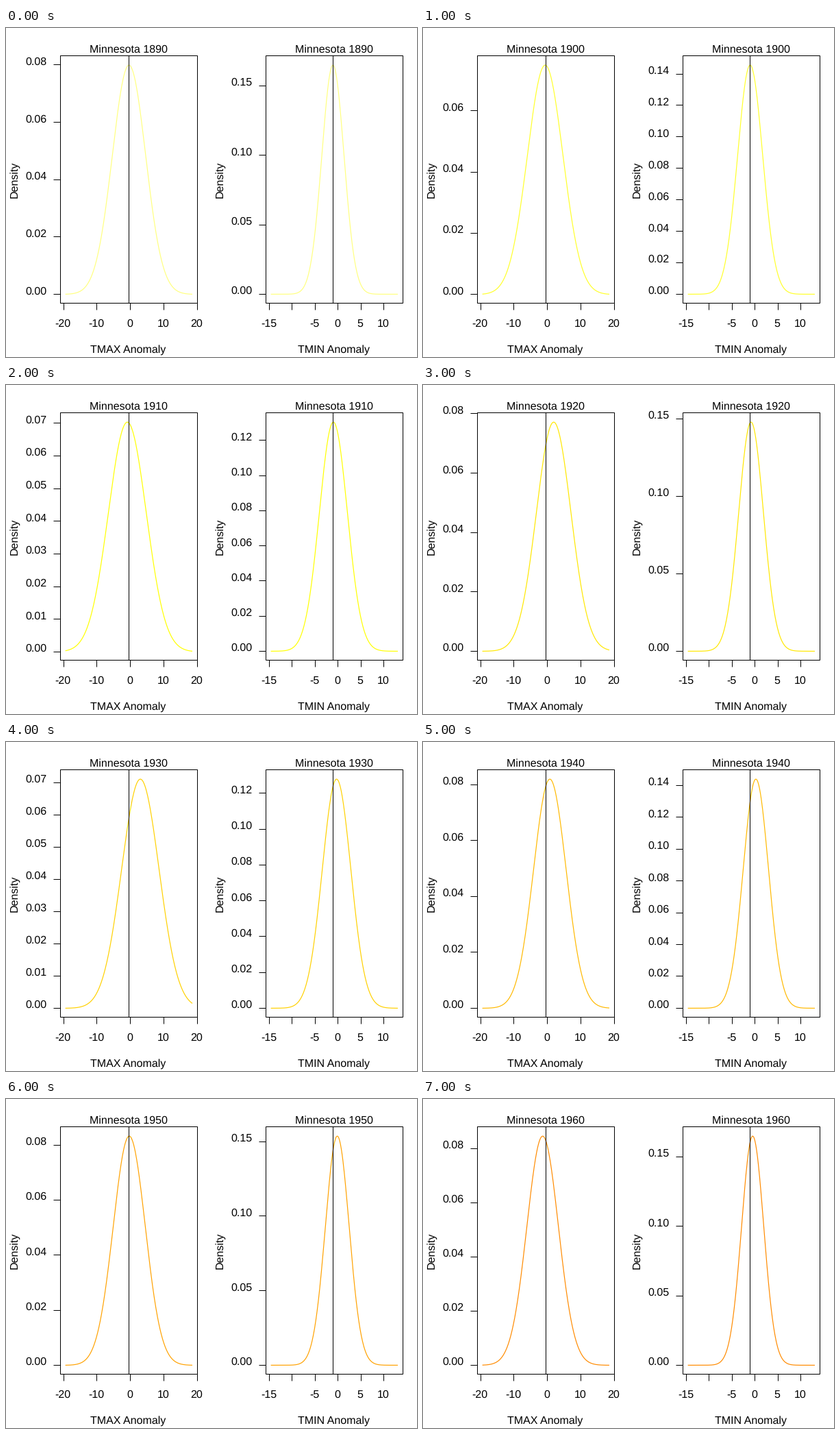
A matplotlib script for the animation above (8000 ms loop, 600 by 480 pixels).

```python
import matplotlib.pyplot as plt
import numpy as np
from matplotlib.animation import FuncAnimation
from matplotlib.patches import Rectangle

W, H, DPI = 600, 480, 100
PX = 72 / DPI  # points per pixel
FONT = dict(family="Liberation Sans", size=16 * PX, color="black")
plt.rcParams["text.hinting"] = "none"

# Margins are counted in text lines; the data fills all but 4% at each end
LINE = 19.2
LEFT, RIGHT = 4.1 * LINE, W / 2 - 1.1 * LINE
TOP, BOTTOM = 2.1 * LINE, H - 4.1 * LINE
PAD_X, PAD_Y = (RIGHT - LEFT) / 27, (BOTTOM - TOP) / 27

DECADES = range(1890, 1970, 10)
KEYS = [1890, 1910, 1920, 1930, 1940, 1960]

# zero and unit map an anomaly to pixels; mean and sd are given at KEYS
PANELS = [
    dict(name="TMAX", shift=0, zero=181, unit=4.875,
         ticks=range(-20, 21, 10), unlabelled=None,
         mean=[-0.4, -0.9, 1.9, 3.0, 0.75, -1.4],
         sd=[4.99, 5.67, 5.17, 5.61, 4.87, 4.72]),
    dict(name="TMIN", shift=W / 2, zero=484.1, unit=6.68,
         ticks=range(-15, 11, 5), unlabelled=-10,
         mean=[-1.1, -1.0, -0.85, -0.3, 0.2, -0.5],
         sd=[2.42, 3.06, 2.70, 3.12, 2.77, 2.42]),
]

fig = plt.figure(figsize=(W / DPI, H / DPI), dpi=DPI, facecolor="white")
ax = fig.add_axes([0, 0, 1, 1])


def line(xs, ys, color="black", width=1):
    ax.plot(xs, ys, color=color, lw=width * PX, solid_capstyle="butt")


def text(x, y, s, ha="center", **kw):
    ax.text(x, y, s, ha=ha, va="baseline", **FONT, **kw)


def heat(i):
    """Pale yellow, then yellow, then towards red."""
    return 1, min(1, 1 - (i - 2) / 11), max(0, 0.5 - i / 3)


def tick_step(peak):
    if peak < 0.074:
        return 0.01
    return 0.02 if peak < 0.146 else 0.05


def draw_panel(p, i):
    year = DECADES[i]
    left, right = LEFT + p["shift"], RIGHT + p["shift"]
    mid = (left + right) / 2
    mean = np.interp(year, KEYS, p["mean"])
    sd = np.interp(year, KEYS, p["sd"])

    def to_x(v):
        return p["zero"] + v * p["unit"]

    xs = np.linspace(left + PAD_X, right - PAD_X, 300)
    z = ((xs - p["zero"]) / p["unit"] - mean) / sd
    density = np.exp(-z * z / 2) / (sd * np.sqrt(2 * np.pi))
    low, peak = density.min(), density.max()

    def to_y(d):
        return np.interp((d - low) / (peak - low), [-1, 2],
                         [2 * BOTTOM - TOP - 3 * PAD_Y,
                          2 * TOP - BOTTOM + 3 * PAD_Y])

    line(xs + 0.5, to_y(density) + 0.5, heat(i), 1.2)
    line([to_x(p["mean"][0])] * 2, [TOP, BOTTOM])
    ax.add_patch(Rectangle((left, TOP), right - left, BOTTOM - TOP,
                           fill=False, ec="black", lw=PX))

    for v in p["ticks"]:
        x = to_x(v)
        line([x, x], [BOTTOM, BOTTOM + LINE / 2])
        if v != p["unlabelled"]:
            text(x - 0.3, 436, str(v))

    step = tick_step(peak)
    for k in range(int(peak * 1.04 / step) + 1):
        y = to_y(k * step)
        line([left - LINE / 2, left], [y, y])
        text(left - LINE, y + 0.3, f"{k * step:.2f}", ha="right")

    text(mid, 36, f"Minnesota {year}")
    text(mid - 0.3, 474, f"{p['name']} Anomaly")
    text(left - 62.4, 221, "Density", rotation=90, rotation_mode="anchor")


def update(i):
    ax.clear()
    ax.set(xlim=(0, W), ylim=(H, 0))
    ax.axis("off")
    for p in PANELS:
        draw_panel(p, i)
    return []


anim = FuncAnimation(fig, update, frames=len(DECADES), interval=1000,
                     repeat=True, repeat_delay=0, blit=False)
plt.show()
```
